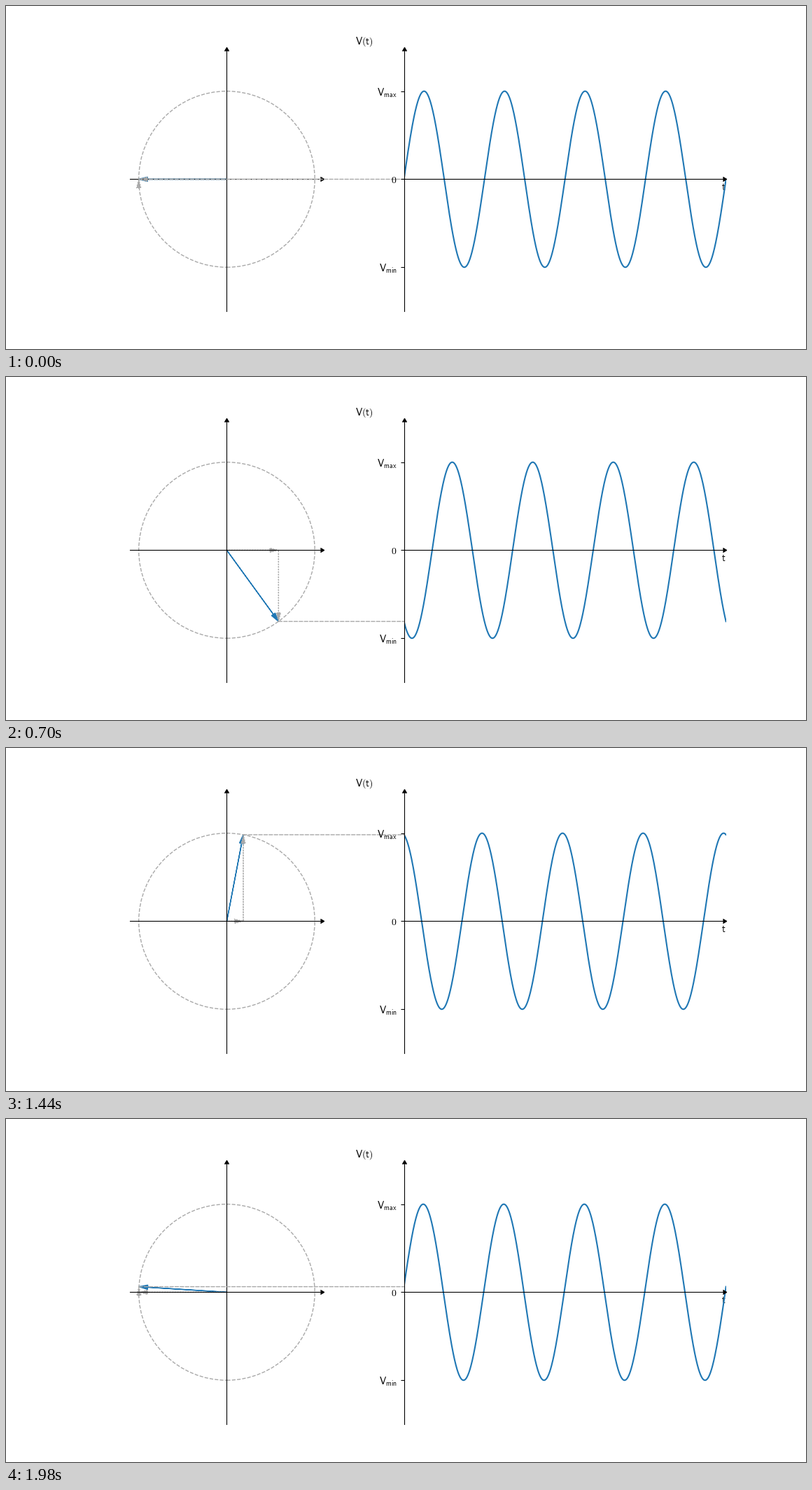
A matplotlib script for the animation above (2000 ms loop, 1143 by 490 pixels).

```python
import numpy as np
import matplotlib.pyplot as plt
from matplotlib.animation import FuncAnimation
from matplotlib.patches import Circle, ConnectionPatch

plt.rcParams["mathtext.fontset"] = "cm"

FRAMES = 100
PERIODS = 4
BLUE, GRAY = "#1f77b4", "darkgray"

fig, (left, right) = plt.subplots(
    1, 2, figsize=(11.43, 4.9), dpi=100, gridspec_kw={"width_ratios": [3, 4]})


def style_axes(ax):
    """Centre the axis lines on zero and cap them with arrowheads."""
    for side in ("top", "right"):
        ax.spines[side].set_visible(False)
    for side in ("left", "bottom"):
        ax.spines[side].set_position("zero")
    ax.set_xticks([])
    ax.set_yticks([])
    cap = dict(color="k", ms=5, clip_on=False, zorder=3)
    ax.plot(1, 0, marker=5, transform=ax.get_yaxis_transform(), **cap)
    ax.plot(0, 1, marker=6, transform=ax.get_xaxis_transform(), **cap)


def add_arrow(ax, color, style):
    return ax.arrow(0, 0, 1, 0, width=0.001, head_width=0.05, head_length=0.1,
                    length_includes_head=True, color=color, ls=style)


left.set(xlim=(-1.1, 1.1), ylim=(-1.5, 1.5), aspect="equal")
right.set(xlim=(0, 1), ylim=(-1.5, 1.5))
style_axes(left)
style_axes(right)

right.set_yticks([-1, 0, 1], [r"$\mathsf{V}_\mathsf{min}$", r"$\mathsf{0}$",
                              r"$\mathsf{V}_\mathsf{max}$"])
right.text(1, -0.122, r"$\mathsf{t}$", ha="right", va="baseline", zorder=1.5)
right.text(-0.1225, 1.535, r"$\mathsf{V(t)}$", ha="center", va="baseline")

left.add_patch(Circle((0, 0), 1, fill=False, ls="--", ec=GRAY))
phasor = add_arrow(left, BLUE, "-")
x_part = add_arrow(left, GRAY, ":")
y_part = add_arrow(left, GRAY, ":")

link = ConnectionPatch((0, 0), (0, 0), "data", "data", axesA=left, axesB=right,
                       ls="--", color=GRAY)
right.add_artist(link)

t = np.linspace(0, 1, 1000)
wave, = right.plot(t, 0 * t, color=BLUE)


def update(i):
    angle = np.pi + 2 * np.pi * i / FRAMES
    x, y = np.cos(angle), np.sin(angle)
    phasor.set_data(dx=x, dy=y)
    x_part.set_data(dx=x, dy=0)
    y_part.set_data(x=x, dx=0, dy=y)
    link.xy1, link.xy2 = (x, y), (0, y)
    wave.set_ydata(np.sin(angle - 2 * np.pi * PERIODS * t))
    return phasor, x_part, y_part, link, wave


anim = FuncAnimation(fig, update, frames=FRAMES, interval=20, repeat=True,
                     init_func=lambda: update(0))
plt.show()
```
